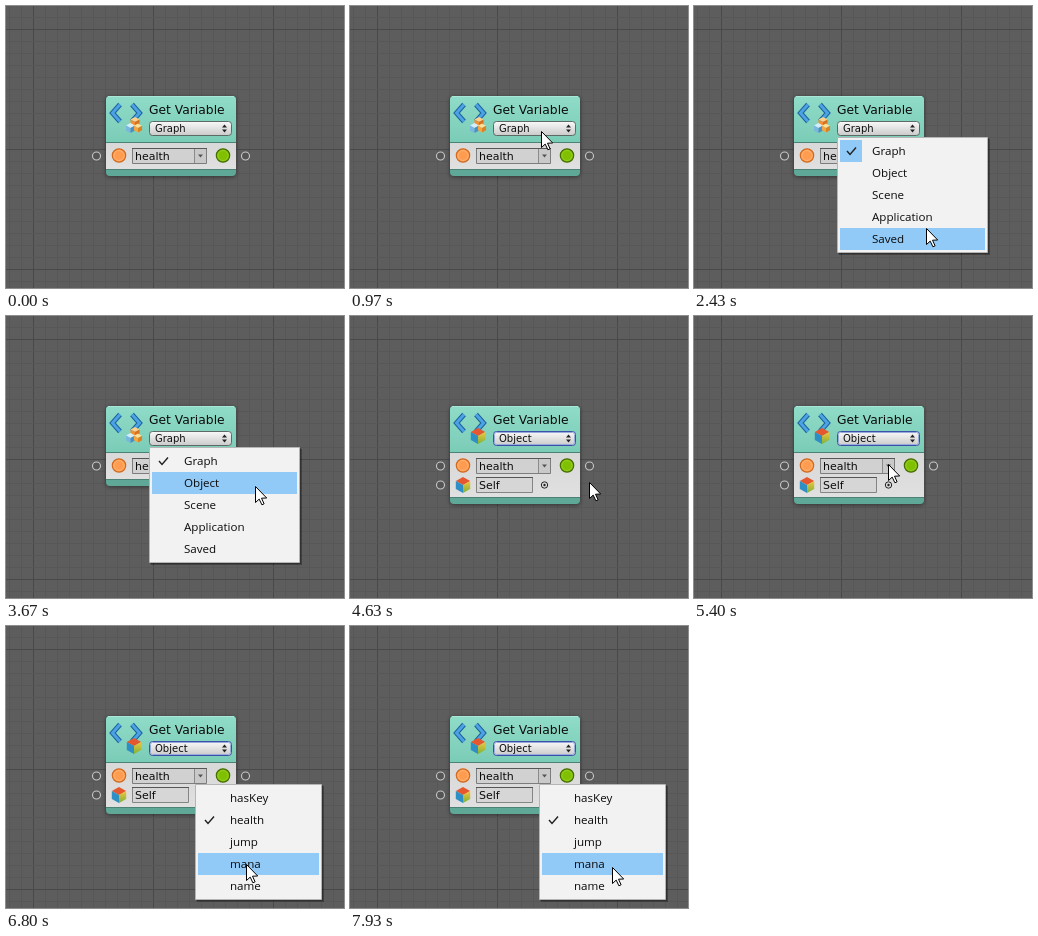
These frames come from a looping animation (338 by 282 pixels, 8000 ms). An HTML page with a canvas:

```html
<!DOCTYPE html>
<html lang="en">
<head>
<meta charset="utf-8">
<title>Get Variable node</title>
<style>
  html, body { margin: 0; width: 100%; height: 100%; overflow: hidden; background: #5c5c5c; }
  canvas { display: block; }
</style>
</head>
<body>
<canvas id="stage" width="338" height="282"></canvas>
<script>
const ctx = document.getElementById('stage').getContext('2d');
const LOOP = 8000;
const NODE_FONT = '"DejaVu Sans", Verdana, sans-serif';
const MENU_FONT = '"Open Sans", "Noto Sans", sans-serif';
const ROW = 22;

// Each move: start time, end time, from, to
const moves = [
  [70, 970, [312, 282], [191, 125]],
  [1500, 2670, [191, 125], [237, 234]],
  [2800, 3670, [237, 234], [249, 170]],
  [4370, 5350, [249, 170], [194, 148]],
  [5900, 7200, [194, 148], [253, 264]],
  [7470, 7960, [253, 264], [262, 241]]
];

const scopeMenu = {
  x: 143, y: 131, w: 151, opens: 1200, closes: 4170, checked: 0, plainCheckFrom: 3300,
  items: ['Graph', 'Object', 'Scene', 'Application', 'Saved']
};
const nameMenu = {
  x: 189, y: 158, w: 127, opens: 5670, closes: LOOP, checked: 1, plainCheckFrom: 6500,
  items: ['hasKey', 'health', 'jump', 'mana', 'name']
};

const clamp = v => Math.max(0, Math.min(1, v));
const smooth = p => p * p * (3 - 2 * p);

function cursorAt(t) {
  let move = moves[0];
  for (const m of moves) if (t >= m[0]) move = m;
  const [start, end, from, to] = move;
  const p = smooth(clamp((t - start) / (end - start)));
  return from.map((v, i) => Math.round(v + (to[i] - v) * p));
}

function rect(x, y, w, h, color) {
  ctx.fillStyle = color;
  ctx.fillRect(x, y, w, h);
}

function shape(points, fill, stroke, width = 1) {
  ctx.beginPath();
  points.forEach(([x, y]) => ctx.lineTo(x, y));
  if (fill) { ctx.closePath(); ctx.fillStyle = fill; ctx.fill(); }
  if (stroke) { ctx.strokeStyle = stroke; ctx.lineWidth = width; ctx.stroke(); }
}

function rounded(x, y, w, h, radius, fill, stroke) {
  ctx.beginPath();
  ctx.roundRect(x, y, w, h, radius);
  ctx.fillStyle = fill;
  ctx.fill();
  if (stroke) { ctx.strokeStyle = stroke; ctx.lineWidth = 1; ctx.stroke(); }
}

function circle(x, y, r, fill, stroke, width = 1) {
  ctx.beginPath();
  ctx.arc(x, y, r, 0, Math.PI * 2);
  if (fill) { ctx.fillStyle = fill; ctx.fill(); }
  if (stroke) { ctx.strokeStyle = stroke; ctx.lineWidth = width; ctx.stroke(); }
}

function text(str, x, y, size, family = NODE_FONT) {
  ctx.font = `${size}px ${family}`;
  ctx.fillStyle = '#0b0b0b';
  ctx.fillText(str, x, y);
}

function fade(y0, y1, ...colors) {
  const g = ctx.createLinearGradient(0, y0, 0, y1);
  colors.forEach((c, i) => g.addColorStop(i / (colors.length - 1), c));
  return g;
}

function drawGrid() {
  rect(0, 0, 338, 282, '#5d5d5d');
  for (let x = 3; x < 338; x += 12) rect(x, 0, 1, 282, x % 120 === 27 ? '#494949' : '#575757');
  for (let y = 11; y < 282; y += 12) rect(0, y, 338, 1, y % 120 === 23 ? '#494949' : '#575757');
}

function drawCube(x, y, r, top, left, right) {
  const h = r * 0.5, w = r * 0.9;
  shape([[x, y - r], [x + w, y - h], [x, y], [x - w, y - h]], top);
  shape([[x - w, y - h], [x, y], [x, y + r], [x - w, y + h]], left);
  shape([[x + w, y - h], [x, y], [x, y + r], [x + w, y + h]], right);
}

function drawObjectCube(x, y) {
  drawCube(x, y, 8, '#e4572f', '#2e8fc4', fade(y - 4, y + 7, '#f5c43c', '#86b53a'));
}

function drawChevron(tip, dir) {
  const points = [[tip + dir * 9, 98.5], [tip + dir * 1.5, 107], [tip + dir * 9, 115.5]];
  ctx.lineJoin = 'miter';
  shape(points, null, '#1f5f9c', 5);
  shape(points, null, '#4ba3e3', 3);
}

function drawPort(x, y) {
  circle(x, y, 4, '#555', '#c8c8c8', 1.1);
}

function drawNode(isObject) {
  const bodyEnd = isObject ? 181 : 163, end = bodyEnd + 7;
  ctx.save();
  ctx.shadowColor = 'rgba(0,0,0,.45)';
  ctx.shadowBlur = 4;
  ctx.shadowOffsetY = 1;
  rounded(100, 90, 130, end - 90, 4, '#5fa898');
  ctx.restore();
  rounded(100, 90, 130, 47, [4, 4, 0, 0], fade(90, 136, '#8fdcc8', '#7bccb7'));
  rect(102, 90, 126, 1, '#a9e8d8');
  rect(100, 136, 130, 1, '#4b8276');
  rect(100, 137, 130, bodyEnd - 137, fade(137, bodyEnd, '#d8d8d8', '#e0e0e0'));
  rect(100, bodyEnd, 130, 1, '#4b8276');

  drawChevron(105, 1);
  drawChevron(135, -1);
  if (isObject) {
    drawObjectCube(128, 120);
  } else {
    drawCube(129, 116, 5, '#ffd08a', '#f09035', '#d9701e');
    drawCube(124.5, 122, 5, '#d5ecfa', '#79b6e0', '#4a8fc4');
    drawCube(132, 122, 4.5, '#ffe09a', '#f2a742', '#d98322');
  }
  text('Get Variable', 143, 108, 12.3);

  rounded(143.5, 115.5, 82, 14, 3, fade(115, 130, '#fafafa', '#c9c9c9'), isObject ? '#3b50a8' : '#5c6965');
  if (isObject) rounded(144.5, 116.5, 80, 12, 2, 'transparent', '#9aa9dc');
  text(isObject ? 'Object' : 'Graph', 149, 126, 10);
  shape([[216, 121.5], [218.5, 118.5], [221, 121.5]], '#222');
  shape([[216, 123.5], [218.5, 126.5], [221, 123.5]], '#222');

  circle(113, 149.5, 6.7, '#ff9c4f', '#d06a20', 1.2);
  circle(113, 149.5, 5, null, '#ffb477');
  circle(217, 149.5, 6.7, '#80c000', '#466c00', 1.2);
  circle(217, 149.5, 5, null, '#94cf28');

  rounded(126.5, 142.5, 74, 15, 0, '#d1d1d1', '#7d7d7d');
  rect(126, 142, 75, 1, '#565656');
  rect(188, 143, 1, 14, '#8b8b8b');
  rect(189, 143, 11, 14, '#c9c9c9');
  shape([[192, 148.5], [197, 148.5], [194.5, 151.5]], '#555');
  text('health', 129, 154, 11);

  drawPort(90.5, 150);
  drawPort(239.5, 150);
  if (isObject) {
    drawPort(90.5, 169);
    drawObjectCube(113, 169);
    rounded(126.5, 161.5, 56, 15, 0, '#d6d6d6', '#858585');
    rect(126, 161, 57, 1, '#565656');
    text('Self', 129, 173, 11);
    circle(194.5, 169, 3.2, null, '#222');
    circle(194.5, 169, 1.2, '#222');
  }
}

function drawMenuRow(menu, i, hovered, t) {
  const x = menu.x + 3, y = menu.y + 3 + i * ROW;
  if (hovered) rect(x, y, menu.w - 6, ROW, '#91c9f7');
  if (i === menu.checked) {
    if (t < menu.plainCheckFrom) rect(x, y, ROW, ROW, hovered ? '#56b0fa' : '#91c9f7');
    shape([[x + 7, y + 11], [x + 10, y + 14.5], [x + 16, y + 7.5]], null, '#202020', 1.4);
  }
  text(menu.items[i], x + 32, y + 15, 11.6, MENU_FONT);
}

function drawMenu(menu, t, cursor) {
  const { x, y, w, opens, closes, items } = menu;
  if (t < opens || t > closes + 200) return;
  const hoverRow = Math.floor((cursor[1] - y - 3) / ROW);
  ctx.save();
  if (t >= closes) {
    // The chosen row lingers briefly after the menu closes
    ctx.globalAlpha = 1 - (t - closes) / 200;
    drawMenuRow(menu, hoverRow, true, t);
  } else {
    const h = items.length * ROW + 6;
    ctx.globalAlpha = clamp((t - opens + 33) / 160);
    rect(x + 2, y + 2, w, h, 'rgba(0,0,0,.3)');
    rect(x + 1, y + 1, w, h, 'rgba(0,0,0,.25)');
    rounded(x + 0.5, y + 0.5, w - 1, h - 1, 0, '#f2f2f2', '#b5b5b5');
    items.forEach((_, i) => drawMenuRow(menu, i, i === hoverRow, t));
  }
  ctx.restore();
}

function drawCursor([x, y]) {
  const outline = [[0, 0], [0, 16], [3.7, 12.6], [6.4, 18.3], [8.6, 17.3], [6, 11.7], [11.2, 11.5]];
  ctx.lineJoin = 'round';
  shape(outline.map(([dx, dy]) => [x + 0.5 + dx, y + 0.5 + dy]), '#fff', '#000');
}

function draw(t) {
  const cursor = cursorAt(t);
  drawGrid();
  drawNode(t >= 4190);
  drawMenu(scopeMenu, t, cursor);
  drawMenu(nameMenu, t, cursor);
  if (t >= 100) drawCursor(cursor);
}

const startTime = performance.now();
function tick() {
  draw((performance.now() - startTime) % LOOP);
  requestAnimationFrame(tick);
}
tick();
</script>
</body>
</html>
```
